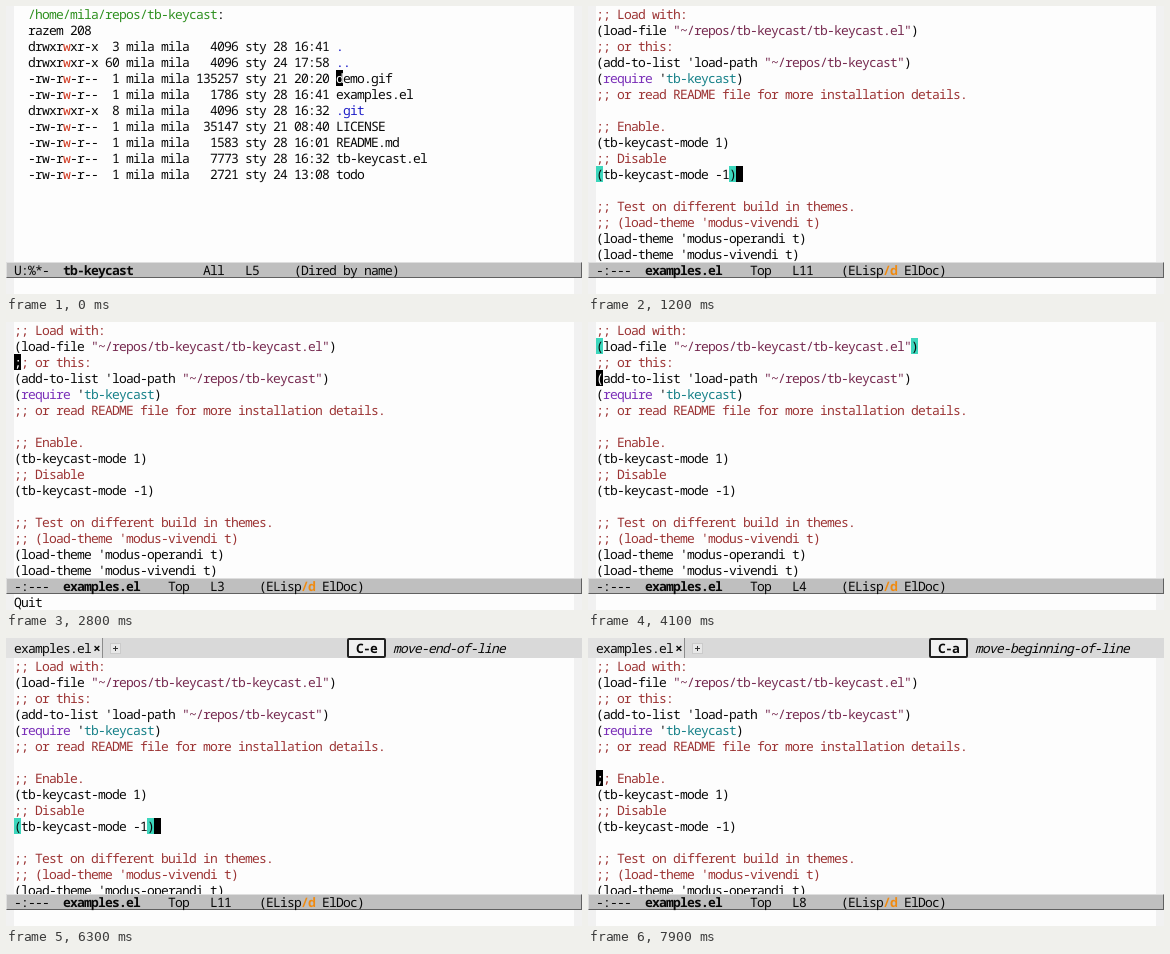
An HTML page for the animation above (8000 ms loop, 576 by 288 pixels).

```html
<!DOCTYPE html>
<html lang="en">
<head>
<meta charset="utf-8">
<title>Key display in an editor</title>
<style>
  html, body { margin: 0; width: 100%; height: 100%; overflow: hidden; }
  body {
    --bg: #fdfdfd; --fringe: #f1f1f1; --bar: #d9d9d9; --light: #f0f0f0;
    position: relative; color: #080808;
    background: linear-gradient(90deg, var(--fringe) 8px, var(--bg) 8px 568px, var(--fringe) 568px);
    font: 13px/16px "Noto Sans Mono", "DejaVu Sans Mono", monospace;
    font-variant-ligatures: none;
    letter-spacing: calc(7px - 1ch);
    text-rendering: geometricPrecision;
    white-space: pre;
  }
  div { position: absolute; box-sizing: border-box; }
  b { letter-spacing: calc(7px - 1ch); }
  #view { left: 0; top: 0; width: 576px; height: 256px; overflow: hidden; }
  #page { left: 0; top: 0; width: 576px; height: 256px; }
  #text { left: 8px; top: 0; }
  #cursor, .paren { width: 7px; height: 16px; }
  #cursor { background: #000; color: var(--bg); }
  .paren { background: #3cd6bc; }
  #tabs { left: 0; top: 0; width: 576px; height: 20px; background: var(--bar); line-height: 20px; }
  #tab {
    left: 0; top: 0; width: 97px; height: 20px; padding-left: 8px;
    background: #e2e2e2; border-right: 1px solid #8c8c8c;
  }
  #close { left: 87px; top: 0; font-weight: bold; }
  #plus {
    left: 104px; top: 5px; width: 11px; height: 11px; border: 1px solid #cbcbcb;
    background: linear-gradient(#333, #333) 2px 4px / 5px 1px no-repeat,
                linear-gradient(#333, #333) 4px 2px / 1px 5px no-repeat, #e8e8e8;
  }
  #keys {
    left: 341px; top: 0; height: 20px; padding: 0 7px; line-height: 16px;
    border: 2px solid #202020; border-radius: 2px; font-weight: bold; background: var(--light);
  }
  #command { top: 0; font-style: italic; }
  #mode {
    left: 0; top: 256px; width: 576px; height: 16px; padding-left: 7px; line-height: 15px;
    background: #bfbfbf; border: 1px solid; border-color: #dedede #606060 #606060 #dedede;
  }
  #echo { left: 8px; top: 272px; height: 16px; }
  .comment { color: #9c3434; }
  .string { color: #762a50; }
  .keyword { color: #7a2fb8; }
  .symbol { color: #168088; }
  .path { color: #2f9020; }
  .write { color: #d03820; }
  .dir { color: #2020c8; }
  .debug { color: #f08a10; }
</style>
</head>
<body>
<div id="view"><div id="page">
  <div class="paren" id="open"></div><div class="paren" id="shut"></div>
  <div id="text"></div>
  <div id="cursor"></div>
</div></div>
<div id="tabs">
  <div id="tab">examples.el</div><div id="close">×</div><div id="plus"></div>
  <div id="keys"></div><div id="command"></div>
</div>
<div id="mode"></div>
<div id="echo"></div>
<script>
const LOOP = 8000, CELL = 7, ROW = 16, LEFT = 8;
const $ = id => document.getElementById(id);
const span = (name, text) => `<span class="${name}">${text}</span>`;

const dired = `  /home/mila/repos/tb-keycast:
  razem 208
  drwxrwxr-x  3 mila mila   4096 sty 28 16:41 .
  drwxrwxr-x 60 mila mila   4096 sty 24 17:58 ..
  -rw-rw-r--  1 mila mila 135257 sty 21 20:20 demo.gif
  -rw-rw-r--  1 mila mila   1786 sty 28 16:41 examples.el
  drwxrwxr-x  8 mila mila   4096 sty 28 16:32 .git
  -rw-rw-r--  1 mila mila  35147 sty 21 08:40 LICENSE
  -rw-rw-r--  1 mila mila   1583 sty 28 16:01 README.md
  -rw-rw-r--  1 mila mila   7773 sty 28 16:32 tb-keycast.el
  -rw-rw-r--  1 mila mila   2721 sty 24 13:08 todo`.split("\n");

const code = `;; Load with:
(load-file "~/repos/tb-keycast/tb-keycast.el")
;; or this:
(add-to-list 'load-path "~/repos/tb-keycast")
(require 'tb-keycast)
;; or read README file for more installation details.

;; Enable.
(tb-keycast-mode 1)
;; Disable
(tb-keycast-mode -1)

;; Test on different build in themes.
;; (load-theme 'modus-vivendi t)
(load-theme 'modus-operandi t)
(load-theme 'modus-vivendi t)`.split("\n");

const paintDired = line => line
  .replace(/^  (\/.*):$/, (_, path) => "  " + span("path", path) + ":")
  .replace(/^(  d.* )(\S+)$/, (_, head, name) => head + span("dir", name))
  .replace(/^(  [d-].{4})w/, (_, head) => head + span("write", "w"));

const paintCode = line => line.startsWith(";;") ? span("comment", line) : line
  .replace(/"[^"]*"/, text => span("string", text))
  .replace(/\(require '([\w-]+)/, (_, name) =>
    "(" + span("keyword", "require") + " '" + span("symbol", name));

const buffers = {
  dired: { lines: dired, html: dired.map(paintDired).join("\n"),
    head: "U:%*-  <b>tb-keycast</b>          All   ", tail: "(Dired by name)" },
  code: { lines: code, html: code.map(paintCode).join("\n"),
    head: "-:---  <b>examples.el</b>    Top   ",
    tail: `(ELisp<b class="debug">/d</b> ElDoc)` }
};

// Each step changes part of the state; "pair" is the row whose parentheses are lit.
const steps = [];
const at = (time, change) => steps.push({ time, change });
const move = (time, row, col, more) => at(time, { row, col, echo: "", ...more });
const light = (time, pair) => at(time, { pair });
const walk = (time, gap, from, to, col) => {
  const dir = Math.sign(to - from);
  for (let i = 0; i <= Math.abs(to - from); i++) move(time + i * gap, from + i * dir, col);
};
const press = (keys, command) => ({ keys, command });
const up = press("C-p", "previous-line"), down = press("C-n", "next-line");
const home = press("C-a", "move-beginning-of-line"), end = press("C-e", "move-end-of-line");
const evalKeys = press("C-x C-e", "eval-last-sexp");

at(0, { buffer: "dired", row: 4, col: 46, pair: -1, tabs: false, echo: "", ...evalKeys });
walk(200, 100, 3, 2, 46);
move(400, 1, 2);
walk(500, 100, 2, 5, 46);
move(1000, 10, 20, { buffer: "code" });
light(1100, 10);
move(1900, 10, 0);
light(2000, -1);
walk(2000, 70, 9, 1, 0);
move(2640, 2, 0);
at(2700, { echo: "Quit" });
move(3100, 1, 0);
light(3200, 1);
move(3400, 1, 46);
move(3800, 1, 0);
move(4000, 2, 0);
move(4100, 3, 0);
light(4200, -1);
walk(4200, 50, 4, 8, 0);
move(4500, 8, 19);
light(4600, 8);
at(4800, { tabs: true, echo: "t", ...evalKeys });
move(5500, 8, 0, home);
move(5700, 9, 0, down);
light(5800, -1);
move(5900, 10, 0, down);
light(6000, 10);
move(6200, 10, 20, end);
at(6600, { tabs: false, echo: "nil" });
move(6900, 9, 10);
light(7000, -1);
move(7100, 8, 19);
light(7200, 8);
at(7400, { tabs: true, echo: "t", ...evalKeys });
move(7700, 7, 10, up);
light(7800, -1);
move(7900, 7, 0, home);

function place(node, row, col) {
  node.style.left = LEFT + col * CELL + "px";
  node.style.top = row * ROW + "px";
}

function draw(s) {
  const { lines, html, head, tail } = buffers[s.buffer];
  $("text").innerHTML = html;
  $("page").style.top = s.tabs ? "20px" : "0";
  place($("cursor"), s.row, s.col);
  $("cursor").textContent = lines[s.row][s.col] || "";

  const lit = s.pair >= 0;
  $("open").hidden = $("shut").hidden = !lit;
  if (lit) {
    place($("open"), s.pair, 0);
    place($("shut"), s.pair, lines[s.pair].length - 1);
  }

  $("tabs").hidden = !s.tabs;
  $("keys").textContent = s.keys;
  $("command").textContent = s.command;
  $("command").style.left = 341 + 4 + (s.keys.length + 3) * CELL + "px";
  $("mode").innerHTML = head + ("L" + (s.row + 1)).padEnd(7) + tail;
  $("echo").textContent = s.echo;
}

let shown = 0;
const start = performance.now();
function tick() {
  const time = (performance.now() - start) % LOOP;
  const past = steps.filter(step => step.time <= time);
  if (past.length !== shown) {
    shown = past.length;
    draw(Object.assign({}, ...past.map(step => step.change)));
  }
  requestAnimationFrame(tick);
}
tick();
</script>
</body>
</html>
```
